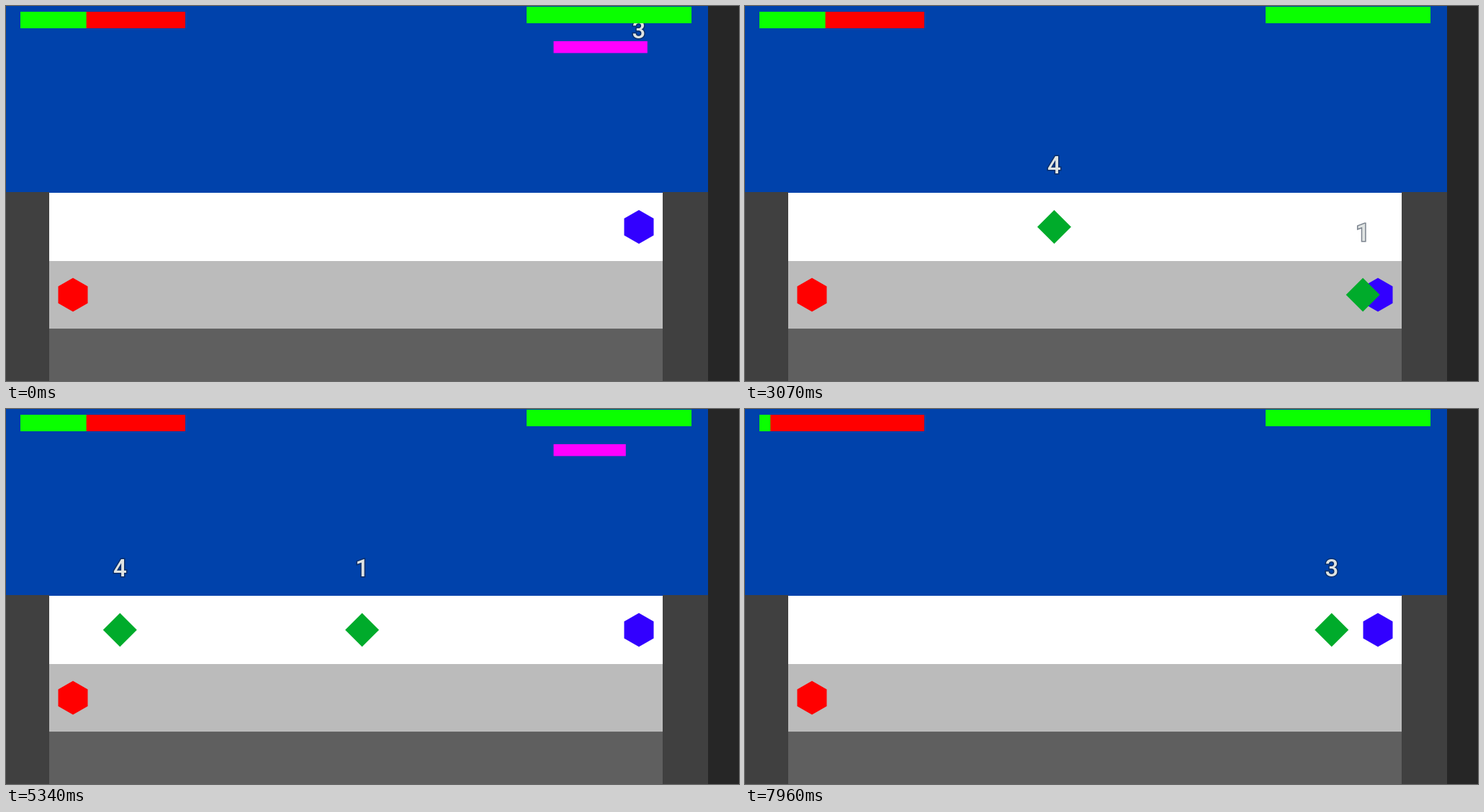
An HTML page that plays this animation: 1018x522 px, repeating every 8000 ms.

```html
<!DOCTYPE html>
<html lang="en">
<head>
<meta charset="utf-8">
<title>Lane duel</title>
<style>
  html, body { margin: 0; width: 100%; height: 100%; overflow: hidden; background: #262626; }
  svg { display: block; }
  text {
    font: 500 33px Roboto, Arial, sans-serif;
    text-anchor: middle;
    fill: #dfe3e2;
    stroke: rgba(15, 30, 50, .55);
    stroke-width: 3px;
    paint-order: stroke;
  }
</style>
</head>
<body>
<svg width="1018" height="522" viewBox="0 0 1018 522">
  <defs>
    <path id="hex" d="M0-23.5 20.5-11.75V11.75L0 23.5-20.5 11.75V-11.75Z"/>
    <path id="gem" d="M0-23.5 23.5 0 0 23.5-23.5 0Z" fill="#00ab2b"/>
    <clipPath id="arena"><path d="M0 0H975V522H0Z"/></clipPath>
  </defs>
  <path fill="#262626" d="M0 0H1018V522H0Z"/>
  <path fill="#0042ab" d="M0 0H975V260H0Z"/>
  <path fill="#404040" d="M0 259H60V522H0ZM912 259H975V522H912Z"/>
  <path fill="#fff" d="M60 260H912V355H60Z"/>
  <path fill="#bbb" d="M60 355H912V449.5H60Z"/>
  <path fill="#5f5f5f" d="M60 449.5H912V522H60Z"/>
  <g clip-path="url(#arena)">
    <rect id="charge" x="760.5" height="16.5" fill="#f0f"/>
    <text id="level" x="879"></text>
    <use href="#hex" x="93" y="402" fill="red"/>
    <use id="player" href="#hex" x="879" fill="#3200ff"/>
    <g id="shots"></g>
    <path fill="red" d="M20 8H249V31H20Z"/>
    <rect id="health" x="20" y="8" height="23" fill="#0aff00"/>
    <path fill="#0aff00" d="M723 1H952V24H723Z"/>
  </g>
</svg>
<script>
const LOOP = 8000, BAR = 229, MAX_HEALTH = 15, START_HEALTH = 6;
const LANE_Y = 307.5, LANE_GAP = 94.5, LAUNCH_X = 879;
const GOAL = [60, 93];      // where a shot ends in each lane
const CHARGE = 870;         // ms per charge level
const MERGE = 10;           // gap at which a shot joins the one ahead

// The player's input: when charging begins and when the shot is released
const casts = [
  { press: -3104, fire: 121 },
  { press: 458, fire: 1598 },
  { press: 1920, fire: 3044 },
  { press: 3880, fire: 4843 },
  { press: 4960, fire: 7596 }
];
const laneAt = t => t > 1650 && t < 3500 ? 1 : 0;

const el = id => document.getElementById(id);
const levelAt = (cast, t) => Math.floor((t - cast.press) / CHARGE);
const speed = power => 0.772 * power ** -1.346;     // strong shots are slow
const shotX = (s, t) => s.x - speed(s.power) * (t - s.from);

function makeShot(lane, power, from, x) {
  return { lane, power, from, x, to: from + (x - GOAL[lane]) / speed(power), damage: lane ? 0 : power };
}

// A faster shot that catches the one ahead adds its power to it
function planShots() {
  const list = [];
  for (const cast of casts) {
    const lane = laneAt(cast.fire);
    const shot = makeShot(lane, levelAt(cast, cast.fire), cast.fire, LAUNCH_X);
    const ahead = list.findLast(s => s.lane === lane && s.to > shot.from);
    list.push(shot);
    if (!ahead) continue;
    const gap = LAUNCH_X - shotX(ahead, shot.from);
    const meet = shot.from + (gap - MERGE) / (speed(shot.power) - speed(ahead.power));
    if (meet < shot.from || meet > Math.min(shot.to, ahead.to)) continue;
    const merged = makeShot(lane, shot.power + ahead.power, meet, shotX(shot, meet));
    for (const s of [shot, ahead]) Object.assign(s, { to: meet, damage: 0 });
    list.push(merged);
  }
  return list;
}

function svg(tag, parent, attrs = {}) {
  const node = parent.appendChild(document.createElementNS('http://www.w3.org/2000/svg', tag));
  for (const key in attrs) node.setAttribute(key, attrs[key]);
  return node;
}

const shots = planShots();
for (const s of shots) {
  s.node = svg('g', el('shots'));
  svg('use', s.node, { href: '#gem' });
  svg('text', s.node, { y: -75 }).textContent = s.power;
}

function draw(t) {
  const drop = laneAt(t) * LANE_GAP;
  el('player').setAttribute('y', LANE_Y + drop);
  el('charge').setAttribute('y', 49 + drop);
  el('level').setAttribute('y', 45 + drop);

  const cast = casts.find(c => t >= c.press && t < c.fire);
  const fill = cast ? (t - cast.press) % CHARGE / CHARGE : 0;
  el('charge').setAttribute('width', fill * BAR);
  el('level').textContent = cast && levelAt(cast, t) || '';

  let health = START_HEALTH;
  for (const s of shots) {
    if (t >= s.to) health -= s.damage;
    const live = t >= s.from && t < s.to;
    s.node.style.display = live ? '' : 'none';
    s.node.setAttribute('transform', `translate(${shotX(s, t)} ${LANE_Y + s.lane * LANE_GAP})`);
  }
  el('health').setAttribute('width', health / MAX_HEALTH * BAR);
}

const start = performance.now();
function tick() {
  draw((performance.now() - start) % LOOP);
  requestAnimationFrame(tick);
}
tick();
</script>
</body>
</html>
```
